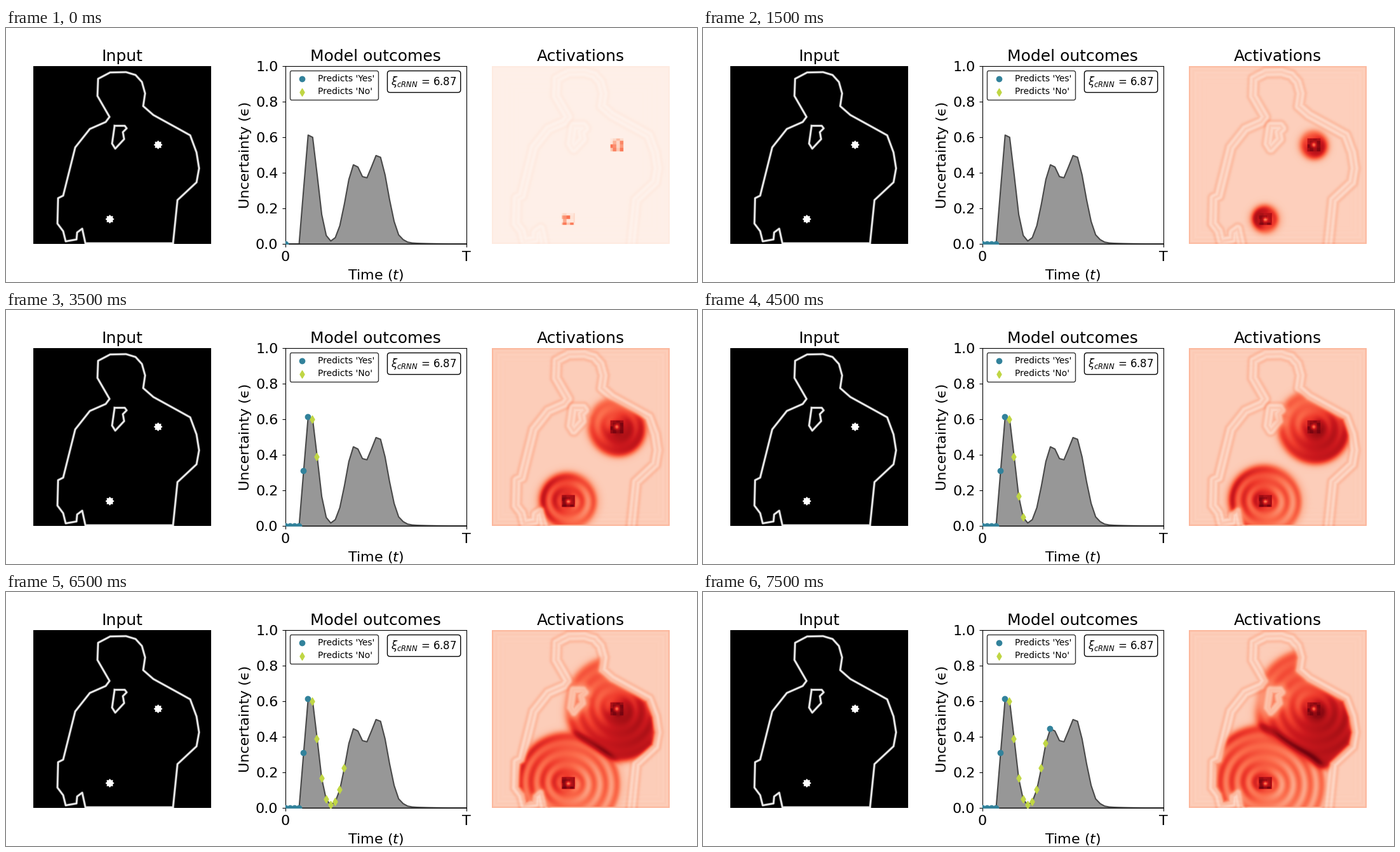
Animation of 1088x400 px, one loop 8000 ms. Source, as a matplotlib script:

```python
import numpy as np
import matplotlib.pyplot as plt
from matplotlib.animation import FuncAnimation
from matplotlib.path import Path

W, H, DPI = 1088, 400, 100
STEPS, INTERVAL = 16, 500
SIDE, CELLS = 280, 150
YES, NO = "#32829b", "#c0d644"

plt.rcParams["font.family"] = "DejaVu Sans"
fig = plt.figure(figsize=(W / DPI, H / DPI), dpi=DPI, facecolor="white")


def panel(x, y, w, h, title):
    ax = fig.add_axes([x / W, 1 - (y + h) / H, w / W, h / H])
    ax.set_title(title, fontsize=18)
    return ax


def bare(ax):
    ax.set_xticks([])
    ax.set_yticks([])
    ax.spines[:].set_visible(False)
    ax.set_xlim(0, SIDE)
    ax.set_ylim(SIDE, 0)


def sig(x):
    return 0.5 * (1 + np.tanh(x / 2))


def bump(x, width):
    return np.exp(-(x / width) ** 2)


# Key points of the shapes, in panel pixels with y pointing down
body = np.array([
    (220, 279), (227, 211), (257, 183), (261, 161), (257, 136), (247, 109),
    (229, 99), (189, 77), (173, 63), (176, 43), (171, 25), (161, 14),
    (146, 9.5), (121, 10), (102, 20), (101, 47), (120, 80), (114, 88),
    (89, 99), (66, 128), (47, 204), (39, 208), (38, 248), (47, 260),
    (51, 276), (68, 273), (69, 262), (77, 256), (82, 279)])
scarf = np.array([(128, 94), (144, 94), (147, 98), (141, 104), (143, 115),
                  (129, 130), (124, 122), (128, 94)])
seeds = [(196.5, 124), (120.5, 241)]

# Input panel
ax_in = panel(43, 60, SIDE, SIDE, "Input")
bare(ax_in)
ax_in.set_facecolor("black")
for line in (np.vstack([body, body[:1]]), scarf):
    for width, alpha in ((2.9, 0.4), (1.7, 0.9)):
        ax_in.plot(*line.T, color="white", lw=width, alpha=alpha,
                   solid_joinstyle="round")
turn = np.arange(16) * np.pi / 8
reach = np.where(np.arange(16) % 2, 5, 7)
for x, y in seeds:
    ax_in.fill(x + reach * np.cos(turn), y + reach * np.sin(turn),
               color="white", lw=0)

# Outcome panel
steps = np.arange(41)
curve = (np.minimum(0.64 * bump(steps - 5.45, 2.2),
                    0.31 * np.clip(steps - 3, 0, None))
         + 0.43 * bump(steps - 15.1, 2.6) + 0.5 * bump(steps - 20.5, 3)
         + 0.01 * (steps > 25) * np.exp((25 - steps) / 6))
says_no = (steps >= 6) & (steps <= 14)

ax = panel(439.6, 60, 285, SIDE, "Model outcomes")
ax.fill_between(steps, curve, facecolor="#979797", edgecolor="#484848", lw=1.5)
dot_style = dict(s=36, linewidths=1, zorder=3)
yes = ax.scatter([], [], marker="o", color=YES, label="Predicts 'Yes'",
                 **dot_style)
no = ax.scatter([], [], marker="d", color=NO, label="Predicts 'No'",
                **dot_style)
ax.set_xlim(0, 40)
ax.set_ylim(0, 1)
ax.set_xticks([0, 40], ["0", "T"])
ax.tick_params(labelsize=16, pad=4.5)
ax.set_xlabel("Time ($t$)", fontsize=16, labelpad=5)
ax.set_ylabel("Uncertainty (\u03f5)", fontsize=16)
ax.legend(loc="upper left", fontsize=10, edgecolor="black")
ax.text(0.948, 0.9125, r"$\xi_{cRNN}$ = 6.87", transform=ax.transAxes,
        fontsize=12, ha="right", va="center",
        bbox=dict(boxstyle="round,pad=0.36,rounding_size=0.25",
                  facecolor="white", edgecolor="black"))


# Activation panel
def distance(line):
    """Distance of every cell to a polyline."""
    best = np.full(X.shape, np.inf)
    for (x0, y0), (x1, y1) in zip(line[:-1], line[1:]):
        dx, dy = x1 - x0, y1 - y0
        t = ((X - x0) * dx + (Y - y0) * dy) / (dx * dx + dy * dy)
        t = np.clip(t, 0, 1)
        best = np.minimum(best, np.hypot(X - x0 - t * dx, Y - y0 - t * dy))
    return best


grid = (np.arange(CELLS) + 0.5) * SIDE / CELLS
X, Y = np.meshgrid(grid, grid)
d_body, d_scarf = distance(body), distance(scarf)
inside = Path(body).contains_points(np.c_[X.ravel(), Y.ravel()])
depth = np.where(inside.reshape(X.shape), d_body, -d_body)
room = sig((depth - 4.5) / 1.8) * (1 - 0.9 * bump(d_scarf, 8))
shade = 1 - 0.85 * bump(X - 92, 32) * bump(Y - 105, 34)
rim = np.minimum(np.minimum(X, SIDE - X), np.minimum(Y, SIDE - Y))
polar = [(np.hypot(X - x, Y - y), np.arctan2(Y - y, X - x)) for x, y in seeds]
grain = np.kron(np.random.default_rng(3).random((50, 50)), np.ones((3, 3)))


def wave(i, k):
    """Weight and level of the front that spreads from seed k."""
    r, a = polar[k]
    lag = 5 + 6 * i - r + 0.15 * i * np.sin(2 * a + k)
    ripple = np.cos(2 * np.pi * (lag - 8) / 18) * (0.6 + 0.4 * np.cos(2 * a))
    weight = sig(lag / 2.6) * room
    if k == 0:
        weight = weight * shade
        level = 0.6 + 0.006 * i + 0.13 * np.cos(a - 0.9) + 0.05 * ripple
    else:
        level = 0.6 - 0.008 * i + 0.07 * np.cos(a + 2.6) + 0.1 * ripple
        level += 0.1 * bump(lag - 6, 9) * sig(6 * np.cos(a + 2.8))
    return weight, level + 0.18 * bump(r, 17)


def activation(i):
    warm = 1 - np.exp(-i)
    v = np.full(X.shape, 0.035 + 0.155 * warm)
    gain = 0.3 + 0.45 * warm
    for d in (d_body, d_scarf):
        v += gain * (0.09 * bump(d - 8, 2.6) - 0.05 * bump(d - 4, 2.5)
                     + 0.04 * bump(d, 2))
    v += gain * (0.1 * bump(rim, 2.5)
                 + 0.025 * np.cos(rim * 0.9) * np.exp(-rim / 12))

    # Both fronts share the floor; they pile up where they meet
    (wa, la), (wb, lb) = wave(i, 0), wave(i, 1)
    gap = polar[1][0] - polar[0][0]
    pa = wa * sig((gap + 6) / 6) + 1e-9
    pb = wb * sig((-gap - 6) / 6) + 1e-9
    level = (pa * la + pb * lb) / (pa + pb)
    level += 0.22 * bump(gap - 8, 12) * wa * wb
    weight = warm * (1 - (1 - wa) * (1 - wb))
    v += weight * (level - v)

    for (x, y), (r, _) in zip(seeds, polar):
        square = np.maximum(abs(X - x), abs(Y - y)) < 10
        start = 0.08 + 0.4 * grain ** 2
        full = 0.84 + 0.13 * grain - 0.45 * bump(r, 3.5)
        v = np.where(square, start + warm * (full - start), v)
    return np.clip(v, 0, 1)


ax_act = panel(765, 60, SIDE, SIDE, "Activations")
image = ax_act.imshow(activation(0), cmap="Reds", vmin=0, vmax=1,
                      extent=(0, SIDE, SIDE, 0), aspect="auto")
bare(ax_act)


def draw(i):
    seen = steps <= i
    for dots, kind in ((yes, ~says_no), (no, says_no)):
        dots.set_offsets(np.c_[steps, curve][seen & kind])
    image.set_data(activation(i))
    return yes, no, image


anim = FuncAnimation(fig, draw, frames=STEPS, interval=INTERVAL,
                     repeat=True, repeat_delay=0)
plt.show()
```
